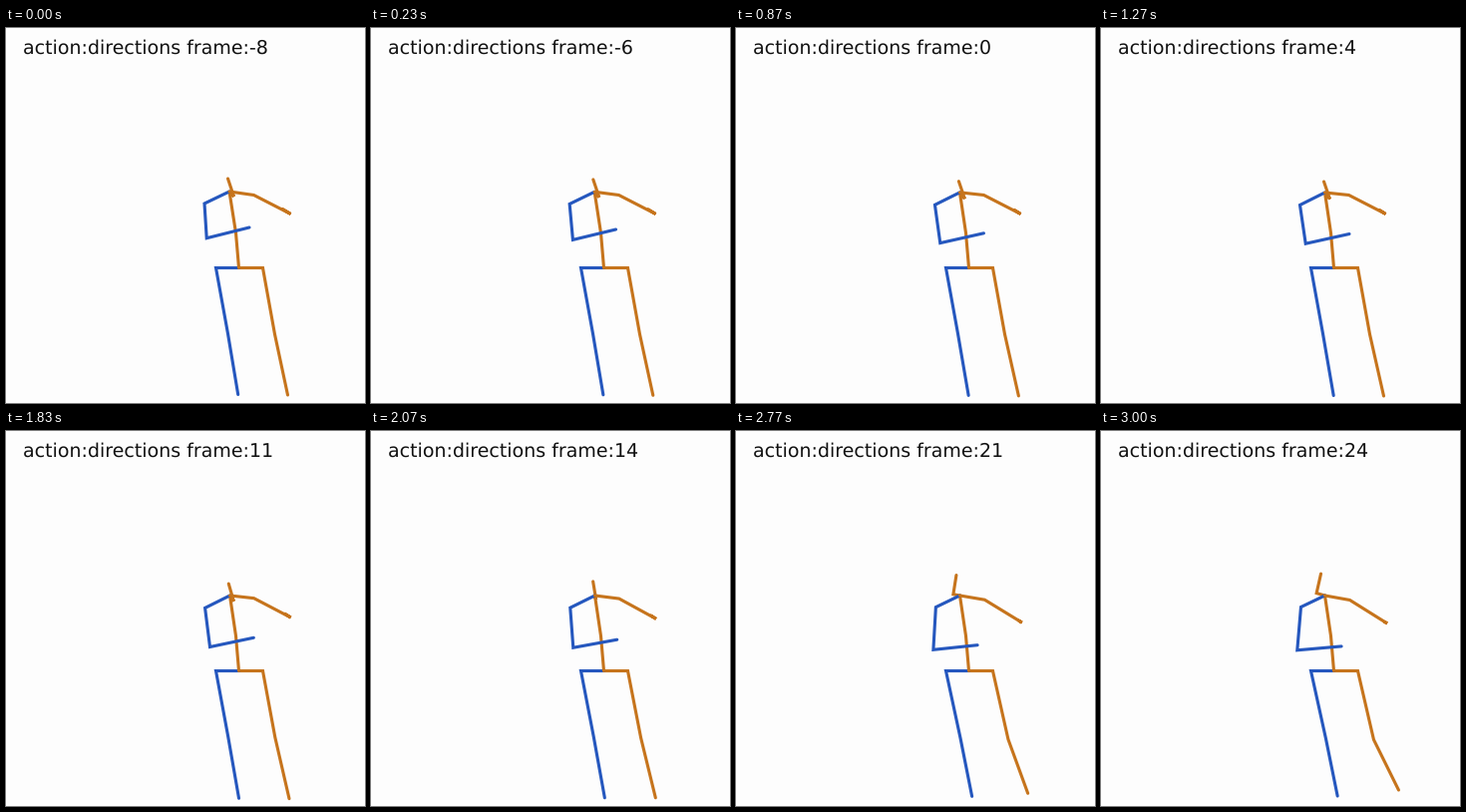
Write a matplotlib script that moves like this. It is 360x376 px and loops after 3060 ms.

```python
import numpy as np
import matplotlib.pyplot as plt
from matplotlib.animation import FuncAnimation

W, H, DPI = 360, 376, 100
LOOP, STEP = 3060, 30
BLUE, ORANGE = "#2557be", "#c6741c"
PX = 72 / DPI
FIRST, REST, LAST = -8, 4, 24

plt.rcParams["font.family"] = "DejaVu Sans"
plt.rcParams["text.hinting"] = "none"

# Pose held around the counter value REST
POSE = dict(
    pelvis=(233, 240), spine=(230, 205), neck=(224, 164.5),
    nose=(229, 171), head=(223, 153.5),
    l_hip=(210, 240), l_knee=(222, 306), l_foot=(232.7, 368),
    r_hip=(257, 240), r_knee=(269, 306.5), r_foot=(283, 368.5),
    l_shoulder=(199, 177), l_elbow=(204.7, 215.7), l_wrist=(248.5, 206),
    r_shoulder=(248, 167), r_elbow=(285, 186), r_wrist=(279, 182),
)
# Offsets that fade out before the rest pose
OPENING = dict(
    neck=(-0.5, -1), nose=(-1, -2.5), head=(-1, -3), l_foot=(-0.5, -1),
    l_shoulder=(-0.5, -1.5), l_elbow=(-4, -5.5), l_wrist=(-5, -6.5),
    r_foot=(-1, -1), r_wrist=(-2, -1),
)
# Offsets that grow as the body turns
TURN = dict(
    nose=(-13.5, -9), head=(-3, -11), l_knee=(3, 2), l_foot=(4, -2.5),
    r_knee=(4, 2.5), r_foot=(4, -3), l_shoulder=(1, -1),
    l_elbow=(-8.5, 3.6), l_wrist=(-8, 9.5),
    r_shoulder=(1, 2), r_elbow=(1.5, 6.5), r_wrist=(5, 9),
)
# Final backward step of one foot
KICK = dict(r_foot=(11, -6))

CHAINS = [
    (ORANGE, "pelvis r_hip r_knee r_foot"),
    (BLUE, "pelvis l_hip l_knee l_foot"),
    (ORANGE, "pelvis spine neck nose head"),
    (BLUE, "neck l_shoulder l_elbow l_wrist"),
    (ORANGE, "neck r_shoulder r_elbow r_wrist"),
]


def ramp(n, start, end):
    return np.clip((n - start) / (end - start), 0, 1)


def counter(ms):
    # Playback drags slightly in the first part, then catches up
    return FIRST + int(np.interp(ms, [0, 1290, 2070, LOOP], [0, 13, 22.1, 33]))


def pose(n):
    t = ramp(n, 8, 25)
    layers = [
        (OPENING, (1 - ramp(n, FIRST, REST)) ** 2),
        (TURN, t * t * (3 - 2 * t)),
        (KICK, ramp(n, REST, LAST) ** 4),
    ]
    joints = {name: np.array(xy, float) for name, xy in POSE.items()}
    for offsets, amount in layers:
        for name, offset in offsets.items():
            joints[name] += amount * np.array(offset)
    return joints


fig = plt.figure(figsize=(W / DPI, H / DPI), dpi=DPI, facecolor="#fdfdfd")
ax = fig.add_axes([0, 0, 1, 1])
ax.set(xlim=(-0.5, W - 0.5), ylim=(H - 0.5, -0.5))  # pixel centres
ax.axis("off")

label = ax.text(16.5, 25, "", fontsize=19 * PX, color="#111111", va="baseline")
limbs = [
    (ax.plot([], [], color=color, lw=3.1 * PX, solid_capstyle="round",
             solid_joinstyle="miter")[0], names.split())
    for color, names in CHAINS
]


def draw(i):
    n = counter(i * STEP)
    label.set_text(f"action:directions frame:{n}")
    joints = pose(n)
    for line, names in limbs:
        line.set_data(*zip(*(joints[name] for name in names)))
    return [label] + [line for line, _ in limbs]


anim = FuncAnimation(fig, draw, frames=LOOP // STEP, interval=STEP,
                     repeat=True, repeat_delay=0)
plt.show()
```
